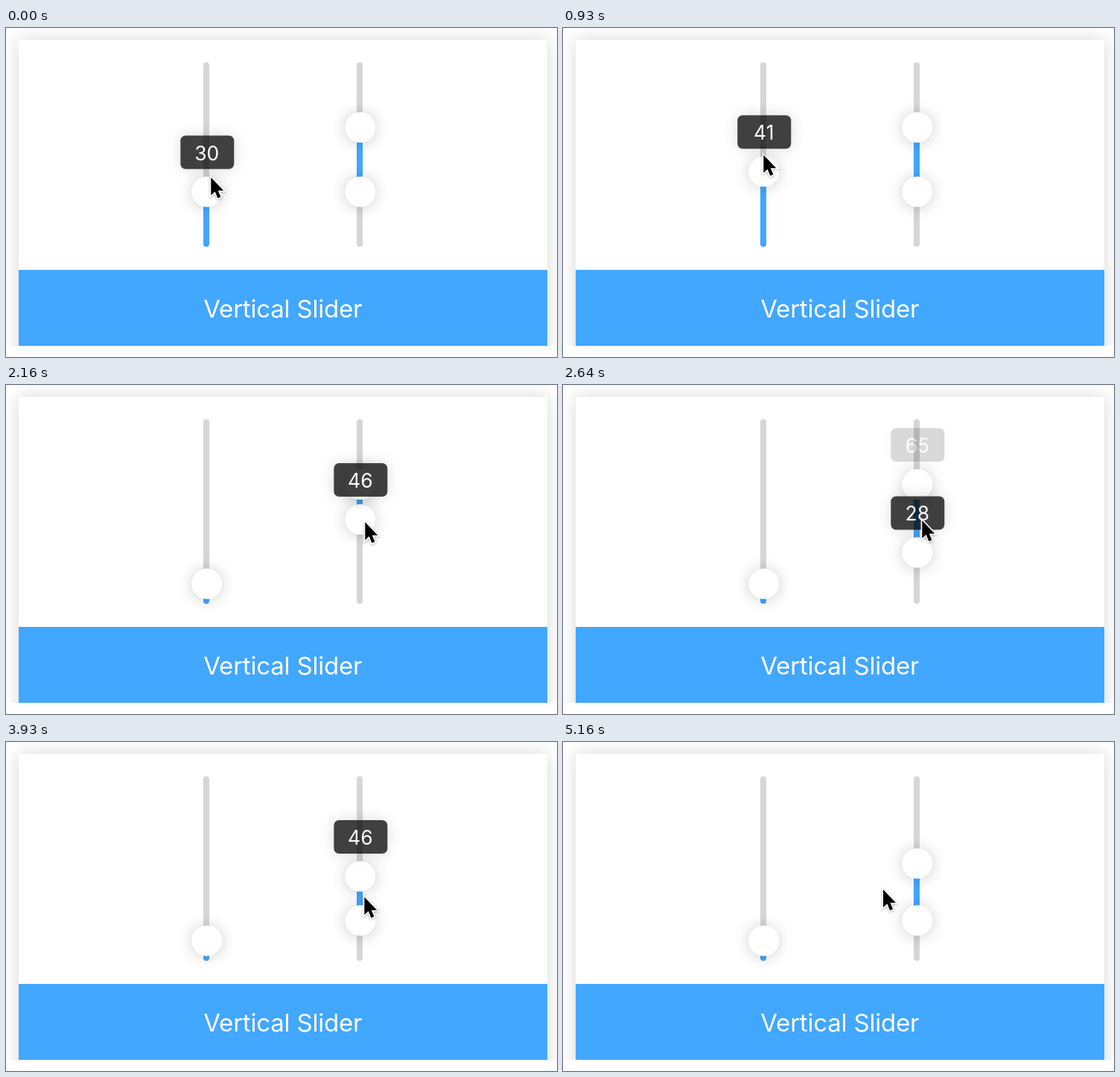
These frames come from a looping animation (740 px wide and 442 px high, 5190 ms). An HTML page:

```html
<!DOCTYPE html>
<html lang="en">
<head>
<meta charset="utf-8">
<title>Vertical Slider</title>
<style>
  html, body { margin: 0; width: 100%; height: 100%; overflow: hidden; background: #fff; }
  #stage { position: relative; width: 740px; height: 427px; overflow: hidden; font-family: Inter, Roboto, sans-serif; color: #fff; }
  .card { position: absolute; left: 16.5px; top: 15.5px; width: 710.5px; height: 440px; background: #fff; box-shadow: 0 0 22px rgba(0, 0, 0, .16); }
  .title { position: absolute; left: 16.5px; top: 324.5px; width: 710.5px; height: 103px; background: #42a7ff; font-size: 33px; line-height: 104px; letter-spacing: -.2px; text-align: center; }
  .track { position: absolute; top: 46px; width: 8px; height: 248px; border-radius: 4px; background: #d6d6d6; overflow: hidden; }
  .fill { position: absolute; left: 0; width: 100%; background: #42a7ff; }
  .thumb { position: absolute; left: -20.5px; top: -20.5px; width: 41px; height: 41px; border-radius: 50%; background: #fff; box-shadow: 0 1px 20px rgba(0, 0, 0, .2); }
  .tip { position: absolute; left: -35.5px; top: -75.5px; width: 72px; height: 45px; border-radius: 7px; background: rgba(0, 0, 0, .75); box-shadow: 0 0 20px rgba(0, 0, 0, .14); font-size: 26.5px; line-height: 46px; text-align: center; }
  #cursor { position: absolute; left: -7px; top: -5.25px; width: 35px; height: 42px; filter: drop-shadow(0 1px 1.5px rgba(0, 0, 0, .3)); }
</style>
</head>
<body>
<div id="stage">
  <div class="card"></div>
  <div class="title">Vertical Slider</div>
  <div class="track" style="left:265px"><div class="fill" id="single"></div></div>
  <div class="track" style="left:471px"><div class="fill" id="range"></div></div>
  <div id="thumbs"></div>
  <div id="tips"></div>
  <svg id="cursor" viewBox="-8 -6 40 48">
    <path d="M0 0V27.5L6.2 21.8L10.3 32L15 30L10.8 20.2H19.4Z" stroke="#fff" stroke-width="3.6" paint-order="stroke"/>
  </svg>
</div>
<script>
const LOOP = 5190, STEP = 30, FADE = 100, HOVER = 60, TRAVEL = 300;
const TRACK_TOP = 46, TRACK_END = 294;
const $ = id => document.getElementById(id);

function add(parent, name) {
  const el = document.createElement('div');
  el.className = name;
  return $(parent).appendChild(el);
}

const knob = x => ({ x, thumb: add('thumbs', 'thumb'), tip: add('tips', 'tip') });
const left = knob(269.3), low = knob(475.3), high = knob(475.3);
const knobs = [left, low, high];

// Each drag eases through its values, one per beat; dx, dy: where the pointer holds the knob
const drags = [
  { knob: left, start: 120, beat: 540, values: [30, 71, 11], dx: 0, dy: -22, sway: 6 },
  { knob: low, start: 1800, beat: 400, values: [30, 46, 28], dx: 7, dy: 3, sway: 0 },
  { knob: high, start: 2680, beat: 140, values: [65, 80, 69], dx: 7, dy: 3, sway: 0 },
  { knob: low, start: 3000, beat: 300, values: [28, 22], dx: 6, dy: 19, sway: 0 },
  { knob: high, start: 3460, beat: 620, values: [69, 42, 53], dx: 6, dy: 28, sway: 0 }
];
const exit = { start: 5160, x: 430, y: 198 };

const clamp = (n, max = 1) => Math.max(0, Math.min(max, n));
const ease = u => u * u * (3 - 2 * u);
const mix = (a, b, u) => a + (b - a) * u;
const yOf = value => 293.7 - 2.473 * value;

drags.forEach((d, i) => {
  d.next = drags[i + 1] || exit;
  d.end = d.start + d.beat * (d.values.length - 1);
  d.leave = Math.max(d.end, d.next.start - TRAVEL);
  d.show = i ? d.start - HOVER : -FADE;
});

function valueAt(d, t) {
  const last = d.values.length - 1;
  const p = clamp((t - d.start) / d.beat, last);
  const i = Math.min(Math.floor(p), last - 1);
  return mix(d.values[i], d.values[i + 1], ease(p - i));
}

function held(d, t) {
  if (d === exit) return exit;
  const turn = 2 * Math.PI * clamp((t - d.start) / (d.end - d.start));
  const sway = d.sway * Math.cos(turn);
  return { x: d.knob.x + d.dx + sway, y: yOf(valueAt(d, t)) + d.dy + sway / 2 };
}

function pointer(t) {
  const d = drags.findLast(g => g.start <= t) || drags[0];
  const from = held(d, t), to = held(d.next, d.next.start);
  const u = ease(clamp((t - d.leave) / (d.next.start - d.leave)));
  return { x: mix(from.x, to.x, u), y: mix(from.y, to.y, u) };
}

const visible = (d, t) => Math.min(
  clamp((t - d.show) / FADE),
  clamp(1 - (t - d.leave - HOVER) / FADE));

const place = (el, x, y) => el.style.transform = `translate(${x}px, ${y}px)`;

function setFill(id, top, bottom) {
  $(id).style.top = top - TRACK_TOP + 'px';
  $(id).style.height = bottom - top + 'px';
}

function draw(t) {
  for (const k of knobs) {
    const own = drags.filter(d => d.knob === k);
    const value = Math.round(valueAt(own.findLast(d => d.start <= t) || own[0], t));
    k.y = yOf(value);
    place(k.thumb, k.x, k.y);
    place(k.tip, k.x, k.y);
    k.tip.textContent = value;
    k.tip.style.opacity = Math.max(...own.map(d => visible(d, t)));
  }
  setFill('single', left.y, TRACK_END);
  setFill('range', high.y, low.y);
  const { x, y } = pointer(t);
  place($('cursor'), x, y);
}

const begin = performance.now();
function tick() {
  const t = (performance.now() - begin) % LOOP;
  draw(Math.floor(t / STEP) * STEP);
  requestAnimationFrame(tick);
}
tick();
</script>
</body>
</html>
```
